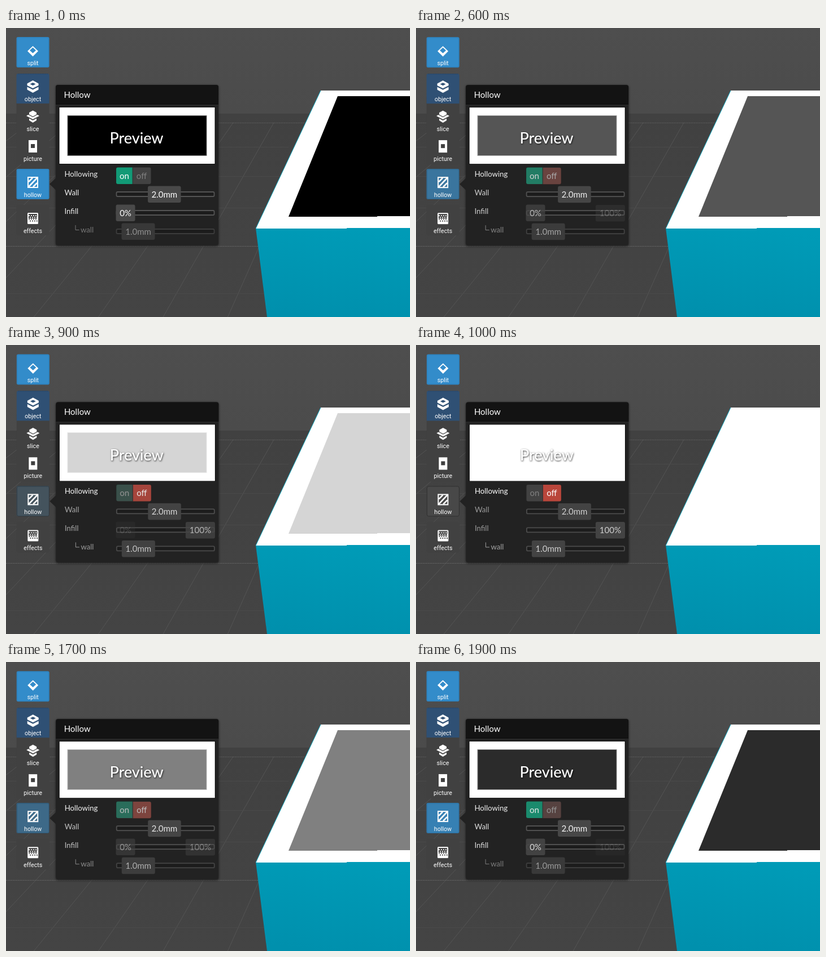
Animation of 715 by 513 pixels, one loop 2 s. Source, as an HTML page:

```html
<!DOCTYPE html>
<html lang="en">
<head>
<meta charset="utf-8">
<title>Hollow panel</title>
<style>
html, body { margin: 0; width: 100%; height: 100%; overflow: hidden; background: #464646; }
svg { display: block; width: 715px; height: 513px; }
.ui { font-family: Lato, sans-serif; font-size: 15px; }
.tool { font-family: Roboto, sans-serif; font-size: 10.7px; fill: #fff; text-anchor: middle; }
.label { font-size: 13.2px; }
.mid { text-anchor: middle; }
</style>
</head>
<body>
<svg id="stage" viewBox="0 0 715 513" xmlns="http://www.w3.org/2000/svg">
  <defs>
    <linearGradient id="sky" x1="0" y1="0" x2="0" y2="1">
      <stop offset="0" stop-color="#4e4e4e"/><stop offset="1" stop-color="#4b4b4b"/>
    </linearGradient>
    <linearGradient id="floor" x1="0" y1="0" x2="0" y2="1">
      <stop offset="0" stop-color="#414141"/><stop offset="1" stop-color="#444"/>
    </linearGradient>
    <linearGradient id="front" x1="0.6" y1="0" x2="0.4" y2="1">
      <stop offset="0" stop-color="#009bb7"/><stop offset="1" stop-color="#0090ad"/>
    </linearGradient>
    <filter id="soft" x="-20%" y="-20%" width="140%" height="140%">
      <feDropShadow dx="0" dy="1" stdDeviation="2" flood-color="#000" flood-opacity="0.6"/>
    </filter>
    <filter id="glow" x="-20%" y="-40%" width="140%" height="180%">
      <feDropShadow dx="0.5" dy="1" stdDeviation="1.5" flood-color="#000" flood-opacity="0.9"/>
    </filter>
  </defs>
  <g id="onView"></g>
  <g id="offView"></g>
</svg>
<script>
const rect = (x, y, w, h, fill, extra = '') =>
  `<rect x="${x}" y="${y}" width="${w}" height="${h}" fill="${fill}" ${extra}/>`;
const path = (d, fill, extra = '') => `<path d="${d}" fill="${fill}" ${extra}/>`;
const line = (d, color, width = 1, extra = '') =>
  path(d, 'none', `stroke="${color}" stroke-width="${width}" ${extra}`);
const text = (x, y, str, fill, cls = '', extra = '') =>
  `<text x="${x}" y="${y}" fill="${fill}" class="${cls}" ${extra}>${str}</text>`;

// Floor grid: depth lines meet at one vanishing point.
function scene(on) {
  const vx = 805, vy = -415;
  let out = rect(0, 0, 715, 152, 'url(#sky)') + rect(0, 152, 715, 361, 'url(#floor)');
  for (let x = -443; x < 500; x += 99) {
    const at = y => vx + (x - vx) * (y - vy) / (388 - vy);
    out += line(`M${at(168)} 168L${at(513)} 513`, '#545454');
  }
  for (const y of [211, 263, 319, 471]) out += line(`M0 ${y}.5H500`, '#4a4a4a');
  out += line('M0 168.5H545', '#5c5c5c', 1, 'stroke-dasharray="2 1"');
  out += line('M0 387.5H460', '#656565', 1, 'stroke-dasharray="2 1"');
  out += path('M442 355L462 513H715V355Z', 'url(#front)');
  out += path('M557 111H715V355H603V356H442Z', '#fff');
  out += line('M557 111L442 356', '#12a5bd', 1);
  if (on) out += path('M587 121H715V334H657V335H500Z', '#000');
  return out;
}

function icons(hollowBg) {
  let out = path('M38 41L47.5 32L57 41L47.5 50.5Z', '#fff')
    + path('M42 39.7L47.5 34.5L53 39.7L47.5 44.7Z', '#338cca');
  // object
  out += path('M37.5 98.5L47.5 93L57.5 98.5V102L47.5 107L37.5 102Z', '#fff')
    + path('M42.5 99.5L47.5 97L52.5 99.5L47.5 102Z', '#2f5074')
    + path('M37.5 104.5L47.5 109.5L57.5 104.5V109.5L47.5 115L37.5 109.5Z', '#fff');
  // slice
  out += path('M41 150L47.5 146.5L54 150V153.5L47.5 157L41 153.5Z', '#fff')
    + path('M36 156L39.5 154L47.5 158.3L55.5 154L59 156L47.5 162Z', '#fff')
    + path('M41 160.5L47.5 164L54 160.5V164L47.5 168L41 164Z', '#fff');
  // picture
  out += rect(40, 199, 15, 22, '#fff') + rect(44, 206, 7, 7, '#3f3f3f');
  // hollow
  out += rect(38, 264, 19, 20, '#fff') + rect(40, 266, 15, 16, hollowBg)
    + line('M40 273L47 266M40 282L55 266M48 282L55 275', '#fff', 2.6);
  // effects
  out += rect(38, 328, 19, 20, '#fff', 'rx="1.5"') + rect(40, 330, 15, 8, '#3f3f3f');
  for (let r = 0; r < 4; r++)
    for (let c = 0; c < 4; c++)
      out += rect(40.2 + c * 3.9 + (r % 2) * 1.9, 332 + r * 3.2, 1.9, 1.9, r < 2 ? '#fff' : '#3f3f3f');
  return out;
}

function toolbar(on) {
  const hollowBg = on ? '#338cca' : '#484848';
  const blue = y => rect(18.5, y, 58, 54, '#338cca', 'rx="3"')
    + rect(19.5, y + 1, 56, 52, 'none', 'rx="2.5" stroke="#2b80bd"');
  let out = rect(18.5, 120, 58, 122, '#414141', 'rx="3"')
    + rect(18.5, 314, 58, 54, '#414141', 'rx="3"')
    + blue(16)
    + path('M18.5 134V84Q18.5 81 21.5 81H73.5Q76.5 81 76.5 84V134Z', '#2f5074')
    + line('M21 81.5H74', '#244468', 1, 'stroke-dasharray="2 1"');
  out += on ? blue(250)
    : rect(19, 250.5, 57, 53, hollowBg, 'rx="3" stroke="#303030"');
  out += icons(hollowBg);
  const names = { split: 66, object: 130, slice: 183, picture: 236, hollow: 300, effects: 364 };
  for (const name in names) out += text(47.5, names[name], name, '#fff', 'tool');
  return out;
}

function slider(y, x, w, str, look) {
  return rect(195.5, y - 4, 173, 8, '#1c1c1c', `rx="2" stroke="${look.track}" stroke-width="1.8"`)
    + rect(x, y - 14.5, w, 29.5, look.thumb, 'rx="3"')
    + text(x + w / 2, y + 6, str, look.ink, 'mid');
}

function panel(on) {
  const live = { track: '#545454', thumb: '#494949', ink: '#fff' };
  const idle = { track: '#4c4c4c', thumb: '#434343', ink: '#d0d0d0' };
  const dim = { track: '#3c3c3c', thumb: '#383838', ink: '#909090' };
  const main = on ? live : idle;
  const ink = on ? '#eee' : '#9a9a9a';
  const subInk = on ? '#777' : '#a2a2a2';

  let out = `<g filter="url(#soft)">${rect(88, 101, 288, 285, '#222', 'rx="4"')}</g>`
    + path('M88.5 266L77 277L88.5 288Z', '#222')
    + path('M88 135V105Q88 101 92 101H372Q376 101 376 105V135Z', '#131313')
    + line('M88 135.5H376', '#0a0a0a') + line('M88 136.5H376', '#303030')
    + text(102.5, 124, 'Hollow', '#fff');

  out += rect(93.5, 140.5, 277, 101, '#000') + rect(94.5, 141, 275, 100, '#fff');
  if (on) out += rect(109, 155.5, 246, 71, '#000', 'stroke="#777" stroke-width="1"');
  out += text(231, 205, 'Preview', '#fff', 'mid', 'font-size="27" filter="url(#glow)"');

  out += text(103.5, 264, 'Hollowing', on ? '#eee' : '#fff', 'label')
    + text(103.5, 297, 'Wall', ink, 'label')
    + text(103.5, 330, 'Infill', ink, 'label')
    + line('M123 350V358.5H129.5', subInk)
    + text(132, 363, 'wall', subInk, 'label');

  out += path('M224 247.5H198Q195 247.5 195 250.5V274Q195 277 198 277H224Z', on ? '#129a76' : '#424242')
    + path('M224 247.5H253.5Q256.5 247.5 256.5 250.5V274Q256.5 277 253.5 277H224Z', on ? '#424242' : '#b9463b')
    + line('M224 247.5V277', '#2c2c2c', 0.8)
    + text(209.5, 268, 'on', on ? '#fff' : '#808080', 'mid')
    + text(240, 268, 'off', on ? '#808080' : '#fff', 'mid');

  out += slider(295, 251, 58.5, '2.0mm', main)
    + (on ? slider(328, 194.5, 34, '0%', main) : slider(328, 317.5, 52, '100%', main))
    + slider(361, 204.5, 59, '1.0mm', on ? dim : idle);
  return out;
}

function view(on) {
  const shift = on ? 0 : 0.4;
  return scene(on) + `<g class="ui" transform="translate(${shift} ${shift})">${toolbar(on)}${panel(on)}</g>`;
}

const onView = document.getElementById('onView');
const offView = document.getElementById('offView');
onView.innerHTML = view(true);
offView.innerHTML = view(false);

// Stepped cross-fade in sixths, every 100 ms.
function offAmount(ms) {
  const step = Math.floor(ms / 100);
  if (step < 5) return 0;
  if (step < 15) return Math.min(step - 4, 6) / 6;
  return (20 - step) / 6;
}

function draw(ms) {
  offView.setAttribute('opacity', offAmount(ms % 2000));
}

const start = performance.now();
function tick() {
  draw(performance.now() - start);
  requestAnimationFrame(tick);
}
draw(0);
requestAnimationFrame(tick);
</script>
</body>
</html>
```
